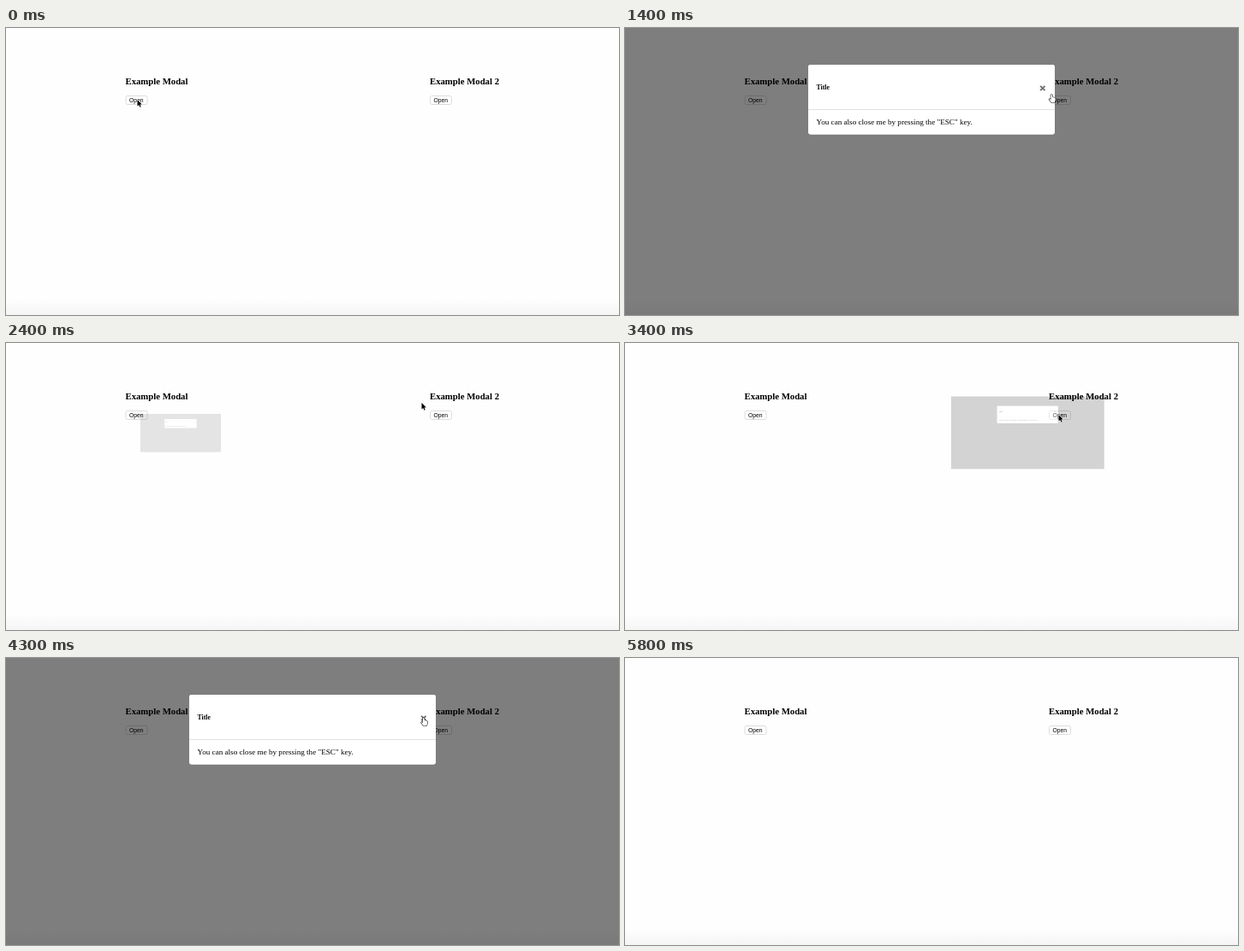
Recreate the animation shown at these times as an HTML page with a canvas. Size 716x336 px, loop 5.96 s.

```html
<!DOCTYPE html>
<html lang="en">
<head>
<meta charset="utf-8">
<title>Modal demo</title>
<style>
html, body { margin: 0; width: 100%; height: 100%; overflow: hidden; background: #fefefe; }
canvas { display: block; }
</style>
</head>
<body>
<canvas id="stage" width="716" height="336"></canvas>
<script>
const ctx = document.getElementById('stage').getContext('2d');
const W = 716, H = 336, LOOP = 5960, STEP = 100;
const SERIF = '"Liberation Serif", Times, serif';
const SANS = '"Liberation Sans", Arial, sans-serif';
const CENTER = { x: 358, y: 169 };

// Each run: opening start, click on the cross, closing start and length, button centre
const runs = [
  { open: 352, focus: 1800, close: 1700, span: 773, x: 152.3, y: 84 },
  { open: 3221, focus: 4400, close: 4330, span: 897, x: 507.3, y: 84 }
];

// Cursor stops: time, x, y
const path = [
  [0, 153.5, 84], [950, 153.5, 84], [1400, 498, 78], [1500, 488, 70.5],
  [2300, 485.5, 70], [2500, 485.5, 70], [2900, 506.5, 84],
  [3850, 506.5, 84], [4250, 487.5, 70], [5200, 487.5, 70]
];
const handTimes = [[1300, 1850], [4200, 4500]];

const clamp = v => Math.max(0, Math.min(1, v));

// CSS "ease" = cubic-bezier(.25, .1, .25, 1)
function ease(x) {
  x = clamp(x);
  let lo = 0, hi = 1, k = 0.5;
  for (let i = 0; i < 24; i++) {
    k = (lo + hi) / 2;
    if (0.75 * k * (1 - k) + k ** 3 < x) lo = k; else hi = k;
  }
  return 0.3 * k * (1 - k) ** 2 + 3 * (1 - k) * k * k + k ** 3;
}

function text(str, x, y, font, color = '#000') {
  ctx.font = font;
  ctx.fillStyle = color;
  ctx.fillText(str, x, y);
}

function box(x, y, w, h, r) {
  ctx.beginPath();
  ctx.roundRect(x, y, w, h, r);
}

function example(title, x) {
  text(title, x, 66, `bold 10.73px ${SERIF}`);
  box(x + 0.5, 79.5, 25, 10, 2);
  ctx.fillStyle = '#fff';
  ctx.fill();
  ctx.strokeStyle = '#dcdcdc';
  ctx.lineWidth = 1;
  ctx.stroke();
  text('Open', x + 4.6, 87.1, `6.75px ${SANS}`);
}

function page() {
  ctx.fillStyle = '#fefefe';
  ctx.fillRect(0, 0, W, H);
  const shade = ctx.createLinearGradient(0, 317, 0, H);
  shade.addColorStop(0, '#fefefe');
  shade.addColorStop(1, '#f5f5f5');
  ctx.fillStyle = shade;
  ctx.fillRect(0, 317, W, H - 317);
  example('Example Modal', 139.5);
  example('Example Modal 2', 495);
}

function cross(x, y, r) {
  ctx.beginPath();
  ctx.moveTo(x - r, y - r);
  ctx.lineTo(x + r, y + r);
  ctx.moveTo(x + r, y - r);
  ctx.lineTo(x - r, y + r);
  ctx.strokeStyle = '#707070';
  ctx.lineWidth = 1.9;
  ctx.stroke();
}

function modal(scale, shift, run, focused) {
  if (scale < 0.004) return;
  ctx.save();
  ctx.globalAlpha = scale ** 0.78;
  ctx.translate(CENTER.x + shift * (run.x - CENTER.x), CENTER.y + shift * (run.y - CENTER.y));
  ctx.scale(scale, scale);
  ctx.translate(-CENTER.x, -CENTER.y);

  // backdrop with a hole, so the card fades against the page
  box(214, 43, 288, 81.5, 3);
  ctx.rect(-3, -2.5, 722, 343);
  ctx.fillStyle = 'rgba(0,0,0,.5)';
  ctx.fill('evenodd');

  box(214, 43, 288, 81.5, 3);
  ctx.fillStyle = '#fff';
  ctx.fill();
  ctx.fillStyle = '#e2e2e2';
  ctx.fillRect(214, 95, 288, 1);
  text('Title', 223.5, 71.6, `bold 7.75px ${SERIF}`);
  text('You can also close me by pressing the "ESC" key.', 223.5, 113.1, `9.15px ${SERIF}`);
  if (focused) {
    box(474.5, 53.5, 26.5, 33, 1.5);
    ctx.strokeStyle = '#a6cdf6';
    ctx.lineWidth = 2.2;
    ctx.stroke();
  }
  cross(487.8, 70.5, 2.7);
  ctx.restore();
}

function showRun(run, t) {
  if (t < run.open || t >= run.close + run.span) return;
  if (t < run.close) {
    const s = ease((t - run.open) / 1000);
    modal(s, 1 - s, run, false);
  } else {
    const p = clamp((t - run.close) / run.span) ** 1.41;
    modal(1 - p, clamp((p - 0.48) / 0.52), run, t >= run.focus);
  }
}

function shape(points, fill, line, width) {
  ctx.beginPath();
  points.forEach(([x, y]) => ctx.lineTo(x, y));
  ctx.closePath();
  ctx.lineJoin = 'round';
  ctx.strokeStyle = line;
  ctx.lineWidth = width;
  ctx.stroke();
  ctx.fillStyle = fill;
  ctx.fill();
}

const arrow = [[0, 0], [0, 7.6], [1.8, 6], [3, 8.8], [4.2, 8.3], [3, 5.5], [5.3, 5.4]];
const hand = [[0, 0], [1, 0.4], [1.3, 3], [3.8, 3.6], [4.8, 4.6], [4.4, 7.4], [3.6, 9.2],
  [0, 9.2], [-2.6, 5.6], [-2, 4.9], [-0.5, 6], [-0.7, 0.5]];

function cursor(t) {
  if (t >= 5200) return;
  const i = path.findIndex(stop => stop[0] > t);
  const [t0, x0, y0] = path[i - 1], [t1, x1, y1] = path[i];
  const k = (t - t0) / (t1 - t0), e = k * k * (3 - 2 * k);
  ctx.save();
  ctx.translate(x0 + (x1 - x0) * e, y0 + (y1 - y0) * e);
  if (handTimes.some(([a, b]) => t >= a && t < b)) shape(hand, '#fff', '#222', 1.2);
  else shape(arrow, '#000', '#fff', 1.1);
  ctx.restore();
}

function draw(t) {
  page();
  runs.forEach(run => showRun(run, t));
  cursor(t);
}

function tick() {
  const t = performance.now() % LOOP;
  draw(Math.min(5800, Math.floor(t / STEP) * STEP));
  requestAnimationFrame(tick);
}
tick();
</script>
</body>
</html>
```
